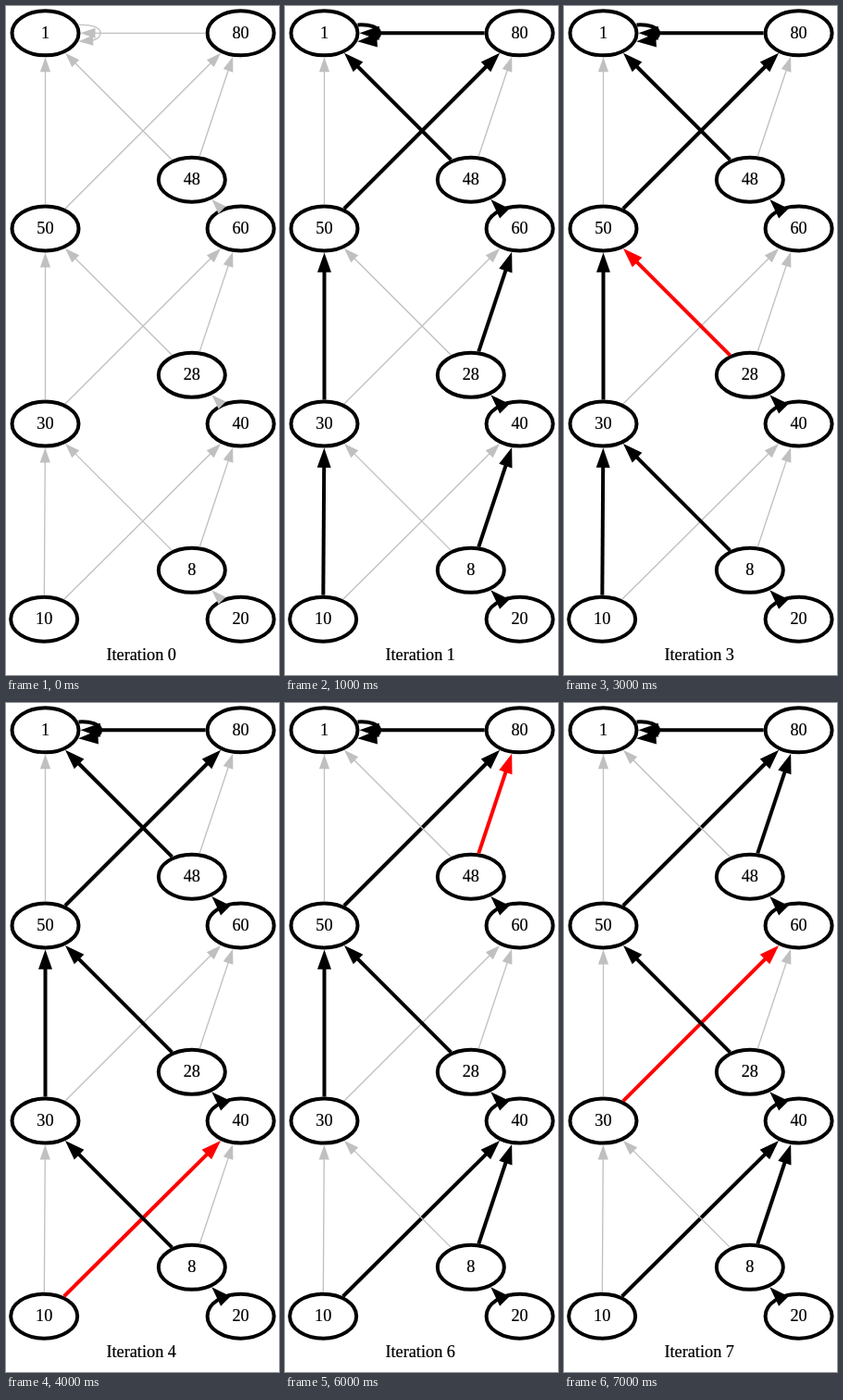
Recreate the animation shown at these times as an HTML page. Size 295x723 px, loop 8 s.

```html
<!DOCTYPE html>
<html lang="en">
<head>
<meta charset="utf-8">
<title>Policy iteration</title>
<style>
  html, body { margin: 0; width: 100%; height: 100%; overflow: hidden; background: #fff; }
  svg { display: block; width: 295px; height: 723px; }
  text { font: 18.3px "Liberation Serif", "Times New Roman", serif; text-anchor: middle; stroke: #000; stroke-width: .2; }
  ellipse { fill: none; stroke: #000; stroke-width: 4; }
  .step { visibility: hidden; animation: show 8s step-end infinite; }
  @keyframes show {
    0% { visibility: visible; }
    12.5%, 100% { visibility: hidden; }
  }
</style>
</head>
<body>
<svg viewBox="0 0 295 723"></svg>
<script>
const svg = document.querySelector('svg');
const GAP = 211.1, LEFT = 42.5, TOP = 29.33;
const RX = 36, RY = 24, RIM = 2;
const GRAY = '#c0c0c0', BLACK = '#000', RED = '#f00';

function add(parent, tag, attrs, text) {
  const el = document.createElementNS('http://www.w3.org/2000/svg', tag);
  for (const key in attrs) el.setAttribute(key, attrs[key]);
  if (text) el.textContent = text;
  return parent.appendChild(el);
}

// Column and row are in units of GAP.
const node = (name, col, row) => ({ name, x: LEFT + col * GAP, y: TOP + row * GAP, next: [] });
const left = [], right = [], mid = [];

for (let row = 0; row < 4; row++) {
  left.push(node(row ? 70 - 20 * row : 1, 0, row));
  right.push(node(80 - 20 * row, 1, row));
  if (row < 3) mid.push(node(48 - 20 * row, 0.75, row + 0.75));
}
left[3].x -= 1.33;

left.forEach((n, i) => n.next = i ? [left[i - 1], right[i - 1]] : [n]);
right.forEach((n, i) => n.next = [i ? mid[i - 1] : left[0]]);
mid.forEach((n, i) => n.next = [left[i], right[i]]);
const nodes = [...left, ...right, ...mid];

// Nodes now choosing their right-hand successor; each later step flips one node.
const goesRight = new Set([50, 28, 8]);
const flips = [8, 28, 10, 8, 48, 30];

// Filled arrowhead; returns the point where the shaft ends.
function head(g, x, y, ux, uy, width, color) {
  const len = 13.33 + 2.01 * width, half = 0.35 * len;
  const bx = x - ux * len, by = y - uy * len;
  const points = [x, y, bx - uy * half, by + ux * half, bx + uy * half, by - ux * half];
  add(g, 'polygon', { points: points.join(' '), fill: color });
  return [bx + ux * 2, by + uy * 2];
}

function edge(g, a, b, color) {
  const width = color === GRAY ? 1.33 : 4;
  const dx = b.x - a.x, dy = b.y - a.y, dist = Math.hypot(dx, dy);
  let d;
  if (a === b) {
    head(g, a.x + 35.7, a.y + 8.9, -0.998, 0.06, width, color);
    d = `M${a.x + 36} ${a.y - 8.9}c13 -.8 23.6 2.3 23.6 8.9c0 4.4 -4 7 -10 8.2`;
  } else {
    const k = 1 / Math.hypot(dx / (RX + RIM), dy / (RY + RIM));
    const end = head(g, b.x - dx * k, b.y - dy * k, dx / dist, dy / dist, width, color);
    if (dist * (1 - 2 * k) < 20) return; // too short for a shaft
    d = `M${a.x + dx * k} ${a.y + dy * k}L${end}`;
  }
  add(g, 'path', { d, fill: 'none', stroke: color, 'stroke-width': width });
}

for (const { name, x, y } of nodes) {
  add(svg, 'ellipse', { cx: x, cy: y, rx: RX, ry: RY });
  add(svg, 'text', { x, y: y + 5.2 }, name);
}

for (let step = 0; step < 8; step++) {
  const flip = flips[step - 2];
  if (flip && !goesRight.delete(flip)) goesRight.add(flip);

  const g = add(svg, 'g', { class: 'step', style: `animation-delay:${step ? step - 8 : 0}s` });
  for (const n of nodes) {
    n.next.forEach((to, i) => {
      const chosen = step > 0 && i === +goesRight.has(n.name);
      edge(g, n, to, !chosen ? GRAY : n.name === flip ? RED : BLACK);
    });
  }
  add(g, 'text', { x: 146.2, y: 707 }, 'Iteration ' + step);
}
</script>
</body>
</html>
```
